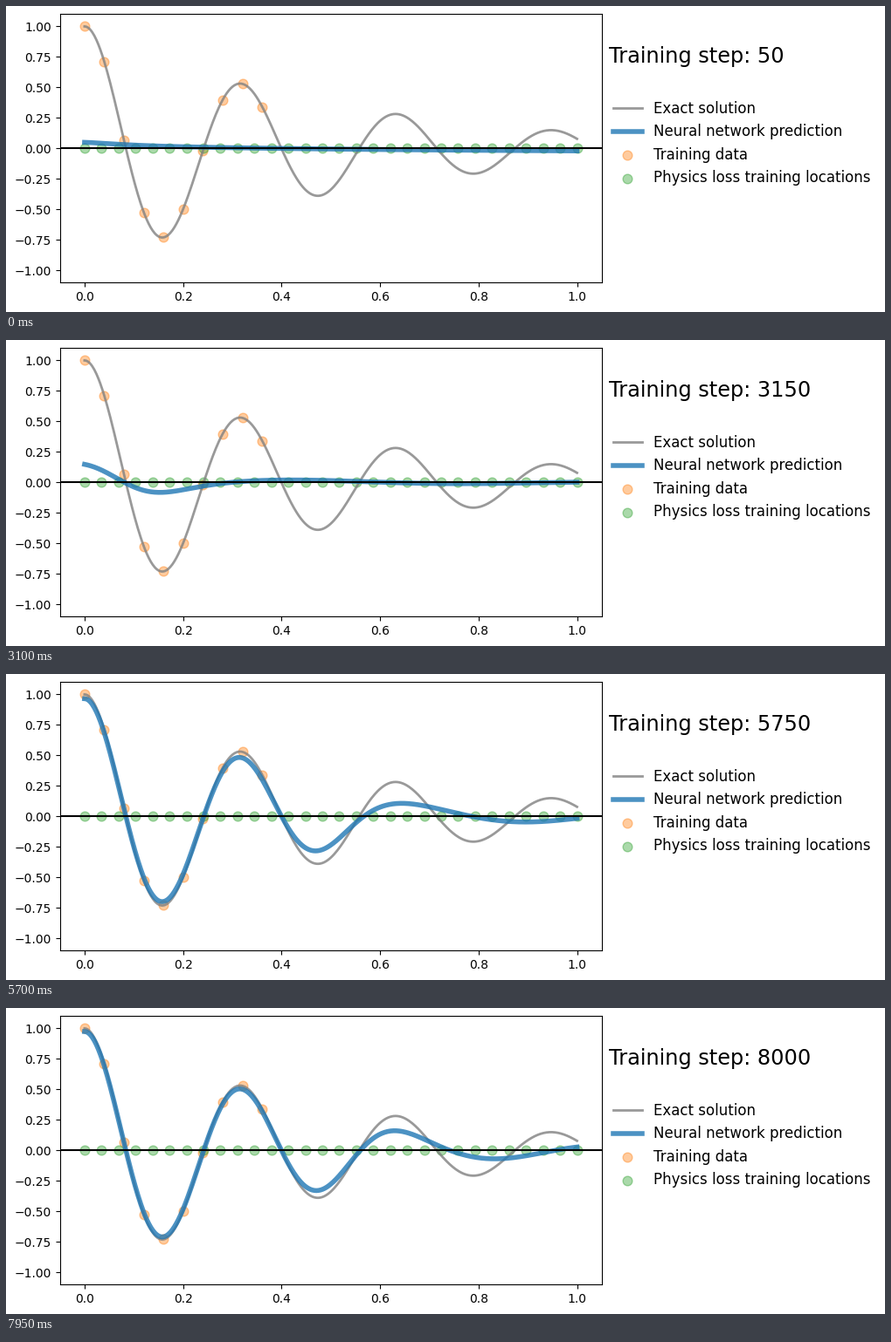
These frames come from a looping animation (1006x351 px, 8000 ms). A matplotlib script:

```python
import numpy as np
import matplotlib.pyplot as plt
from matplotlib.animation import FuncAnimation

W, H, DPI = 1006, 351, 100
FRAMES, INTERVAL, STEP = 160, 50, 50

# Underdamped oscillator released from rest at 1.
DAMP = 2
OMEGA = np.sqrt(20**2 - DAMP**2)
SHIFT = np.arctan(DAMP / OMEGA)


def sigmoid(z):
    return 1 / (1 + np.exp(-z))


def softplus(z):
    return np.log1p(np.exp(z))


def exact(x):
    return np.exp(-DAMP * x) * np.cos(OMEGA * x - SHIFT) / np.cos(SHIFT)


def predict(x, step):
    """Damped wave that is learned up to a front moving right in x."""
    front = 0.66 * (1 - np.exp(-max(0, step - 2650) / 1400))
    gain = 0.11 + 0.87 * np.exp(-np.exp((3520 - step) / 480))
    refine = sigmoid((step - 5700) / 250)

    # Beyond the front the wave is slower and weaker than the exact one.
    tail = 2 + 8.4 * sigmoid((step - 2100) / 500) + 4.3 * refine
    bend = 0.05
    lag = (OMEGA - tail) * bend * (softplus((x - front) / bend)
                                   - softplus(-front / bend))
    lead = 0.7 * sigmoid((4300 - step) / 150) * np.exp(-x / 0.04)
    phase = OMEGA * x - SHIFT - lag + lead
    loss = (1.55 - 0.45 * refine) * sigmoid((x - front) / 0.09)

    tilt = (0.01 - 0.03 * x) * np.exp(-step / 300)
    return gain * np.exp(-DAMP * x - loss) * np.cos(phase) + tilt


x = np.linspace(0, 1, 500)
x_data = x[0:200:20]
x_phys = np.linspace(0, 1, 30)

fig = plt.figure(figsize=(W / DPI, H / DPI), dpi=DPI, facecolor="white")
ax = fig.add_axes([61.72 / W, 33.55 / H, 620 / W, 308 / H])
ax.plot(x, exact(x), color="grey", lw=2, alpha=0.8, label="Exact solution")
line, = ax.plot(x, predict(x, STEP), color="tab:blue", lw=4, alpha=0.8,
                label="Neural network prediction")
ax.scatter(x_data, exact(x_data), s=60, color="tab:orange", alpha=0.4,
           label="Training data")
ax.scatter(x_phys, 0 * x_phys, s=60, color="tab:green", alpha=0.4,
           label="Physics loss training locations")
ax.axhline(0, color="black", lw=1.5)
ax.set_xlim(-0.05, 1.05)
ax.set_ylim(-1.1, 1.1)
ax.legend(loc=(1.01, 0.34), frameon=False, fontsize="large")
title = ax.text(1.065, 0.7, "", fontsize="xx-large", color="black")


def update(frame):
    step = STEP * (frame + 1)
    line.set_ydata(predict(x, step))
    title.set_text(f"Training step: {step}")
    return line, title


anim = FuncAnimation(fig, update, frames=FRAMES, interval=INTERVAL,
                     repeat=True, repeat_delay=0)
plt.show()
```
